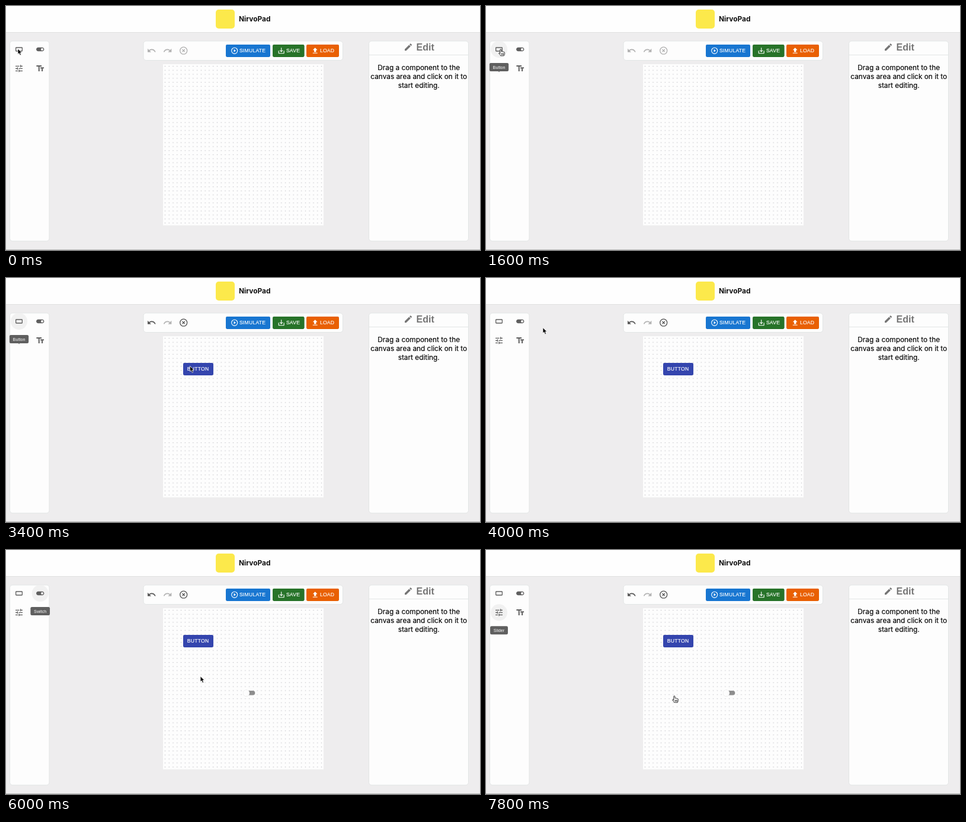
These frames come from a looping animation (800 px wide and 411 px high, 8 s). An HTML page:

```html
<!DOCTYPE html>
<html lang="en">
<head>
<meta charset="utf-8">
<title>GUI builder</title>
<style>
  html, body { margin: 0; width: 100%; height: 100%; overflow: hidden; background: #eeedee; }
  svg { display: block; width: 800px; height: 411px; }
  text { font-family: "Liberation Sans", Arial, sans-serif; }
  .ui { font-family: Inter, "Open Sans", sans-serif; }
  .hint { font-size: 11.85px; text-anchor: middle; fill: #000; stroke: #000; stroke-width: .15px; }
  .label { font-size: 8.6px; letter-spacing: .25px; fill: #fff; stroke: #fff; stroke-width: .15px; }
  .tip { font-size: 7.2px; fill: #fff; text-anchor: middle; }
  .panel { fill: #fdfdfd; stroke: #e2e5e5; }
  .lift { filter: drop-shadow(0 .7px .6px #0004); }
</style>
</head>
<body>
<svg viewBox="0 0 800 411">
  <defs>
    <pattern id="dots" x="265.1" y="98.1" width="6.77" height="6.77" patternUnits="userSpaceOnUse">
      <circle cx="3.4" cy="3.4" r=".8" fill="#c3c3c8"/>
    </pattern>
  </defs>
  <rect width="800" height="411" fill="#eeedee"/>
  <rect width="800" height="44" fill="#fefefe"/>
  <path d="M0 44.5H800" stroke="#e0e0e0"/>
  <path d="M0 410.5H800" stroke="#b9b9b9"/>
  <rect x="354" y="6" width="32" height="32" rx="5" fill="#fce94b"/>
  <text class="ui" x="393" y="26" font-size="11.9" font-weight="700" fill="#111">NirvoPad</text>

  <rect class="panel" x="6.5" y="59" width="66.5" height="337" rx="4.5"/>
  <rect class="panel" x="612.5" y="59" width="168" height="337" rx="4.5"/>
  <path d="M613 82.5H780" stroke="#e2e6e6"/>
  <rect class="panel" x="232" y="59" width="336.5" height="32.5" rx="4.5"/>
  <rect x="265" y="98" width="271" height="271.5" fill="#fdfdfd"/>
  <rect x="265" y="98" width="271" height="271.5" fill="url(#dots)"/>

  <text x="692.5" y="75" font-size="16" font-weight="700" fill="#757575">Edit</text>
  <text class="ui hint" x="696.7" y="108">Drag a component to the</text>
  <text class="ui hint" x="696.7" y="123">canvas area and click on it to</text>
  <text class="ui hint" x="696.7" y="138">start editing.</text>

  <g id="toolbar"></g>
  <g id="placedButton">
    <rect class="lift" x="299" y="143" width="51" height="21" rx="2.4" fill="#3445ae"/>
    <text class="label" x="305.7" y="156.3">BUTTON</text>
  </g>
  <g id="placedSwitch">
    <rect x="401" y="237" width="19.3" height="7.6" rx="3.8" fill="#8e8e8e"/>
    <circle class="lift" cx="405.6" cy="241" r="5.5" fill="#fdfdfd"/>
  </g>
  <circle id="hover" r="14"/>
  <g id="palette"></g>
  <g id="tooltip">
    <rect id="tipBox" y="23" height="14" rx="2.3" fill="#5f5f5f"/>
    <text id="tipText" class="tip" y="32.6"></text>
  </g>
  <g id="ghost">
    <circle r="10.5" opacity=".06"/>
    <circle r="8.5" opacity=".12"/>
    <path id="ghostIcon" transform="scale(.667) translate(-12 -12)" fill="#444"/>
  </g>
  <g id="cursor">
    <path id="arrow" d="M0 0V9.3L2.1 7.4L3.7 11L5.4 10.2L3.9 6.8H6.8Z" stroke="#fff" stroke-width=".7"/>
    <g id="hand" stroke="#111" stroke-width=".85" stroke-linejoin="round" stroke-linecap="round">
      <path fill="#fff" d="M-1.2 6.8V.8Q-1.2 -.3 -.2 -.3T.9 .8V3.7Q2.2 2.9 2.9 4Q4.2 3.3 4.8 4.5Q6.4 4.1 6.4 5.7V7.6Q6.3 9 5.3 10.8H-.3Q-1.3 8.9 -3.1 7.2Q-3.7 6.2 -2.8 5.8Q-2 5.7 -1.2 6.8Z"/>
      <path fill="none" d="M1.2 6.8V9M2.9 6.8V9M4.5 6.8V9"/>
    </g>
    <g id="plus">
      <circle cx="6" cy="15" r="6.4" fill="#2fae35"/>
      <path d="M6 11.5V18.5M2.5 15H9.5" stroke="#fff" stroke-width="1.9"/>
    </g>
  </g>
</svg>
<script>
const $ = id => document.getElementById(id);
const set = (el, attrs) => { for (const k in attrs) el.setAttribute(k, attrs[k]); };
const show = (id, on) => set($(id), { display: on ? 'inline' : 'none' });

const RING = 'M12 2a10 10 0 1 0 0 20 10 10 0 0 0 0-20zm0 18a8 8 0 1 1 0-16 8 8 0 0 1 0 16z';
const ICONS = {
  Button: 'M19 6.5H5c-1.1 0-2 .9-2 2v7c0 1.1.9 2 2 2h14c1.1 0 2-.9 2-2v-7c0-1.1-.9-2-2-2zm0 9H5v-7h14v7z',
  Switch: 'M17 7H7c-2.76 0-5 2.24-5 5s2.24 5 5 5h10c2.76 0 5-2.24 5-5s-2.24-5-5-5zm0 8c-1.66 0-3-1.34-3-3s1.34-3 3-3 3 1.34 3 3-1.34 3-3 3z',
  Slider: 'M3 17v2h6v-2H3zM3 5v2h10V5H3zm10 16v-2h8v-2h-8v-2h-2v6h2zM7 9v2H3v2h4v2h2V9H7zm14 4v-2H11v2h10zm-6-4h2V7h4V5h-4V3h-2v6z',
  Text: 'M2.5 4v3h5v12h3V7h5V4h-13zm19 5h-9v3h3v7h3v-7h3V9z',
  undo: 'M12.5 8c-2.65 0-5.05.99-6.9 2.6L2 7v9h9l-3.62-3.62c1.39-1.16 3.16-1.88 5.12-1.88 3.54 0 6.55 2.31 7.6 5.5l2.37-.78C21.08 11.03 17.15 8 12.5 8z',
  redo: 'M18.4 10.6C16.55 8.99 14.15 8 11.5 8c-4.65 0-8.58 3.03-9.96 7.22L3.9 16c1.05-3.19 4.05-5.5 7.6-5.5 1.95 0 3.73.72 5.12 1.88L13 16h9V7l-3.6 3.6z',
  clear: 'M14.59 8L12 10.59 9.41 8 8 9.41 10.59 12 8 14.59 9.41 16 12 13.41 14.59 16 16 14.59 13.41 12 16 9.41z' + RING,
  simulate: 'M10 16.5l6-4.5-6-4.5v9z' + RING,
  save: 'M19 12v7H5v-7H3v7c0 1.1.9 2 2 2h14c1.1 0 2-.9 2-2v-7h-2zm-6 .67l2.59-2.58L17 11.5l-5 5-5-5 1.41-1.41L11 12.67V3h2v9.67z',
  load: 'M5 20h14v-2H5v2zm0-10h4v6h6v-6h4l-7-7-7 7z',
  pencil: 'M3 17.25V21h3.75L17.81 9.94l-3.75-3.75L3 17.25zM20.71 7.04a1 1 0 0 0 0-1.41l-2.34-2.34a1 1 0 0 0-1.41 0l-1.83 1.83 3.75 3.75 1.83-1.83z'
};

function add(parent, tag, attrs) {
  const el = document.createElementNS('http://www.w3.org/2000/svg', tag);
  set(el, attrs);
  return parent.appendChild(el);
}
const icon = (parent, name, x, y, fill, scale = .667) => add(parent, 'path', {
  d: ICONS[name], fill, transform: `translate(${x} ${y}) scale(${scale}) translate(-12 -12)`
});

const toolbar = $('toolbar');
const [undo, , clear] = ['undo', 'redo', 'clear'].map((name, i) => icon(toolbar, name, 245.7 + 27 * i, 75.2, '#b3b3b3'));
icon(toolbar, 'pencil', 679, 69.3, '#757575');

function action(name, x, width, fill) {
  add(toolbar, 'rect', { x, y: 65, width, height: 21, rx: 2.4, fill, class: 'lift' });
  icon(toolbar, name, x + 14.7, 75.3, '#fff', .56);
  add(toolbar, 'text', { x: x + 22.9, y: 78.4, class: 'label' }).textContent = name.toUpperCase();
}
action('simulate', 371, 75, '#1876d1');
action('save', 450, 53.5, '#277329');
action('load', 507, 55, '#e96003');

const slots = {};
['Button', 'Switch', 'Slider', 'Text'].forEach((name, i) => {
  const slot = slots[name] = { x: 22 + 35.7 * (i % 2), y: 73 + 32.3 * (i >> 1) };
  icon($('palette'), name, slot.x, slot.y, '#5f5f5f');
});

// Each tool is reached, grabbed, carried to its spot and dropped
const DRAGS = [
  { tool: 'Button', reach: 600, grab: 2000, land: 2900, drop: 3200, spot: { x: 313, y: 149 } },
  { tool: 'Switch', reach: 4200, grab: 4740, land: 5300, drop: 5600, spot: { x: 408, y: 241 } },
  { tool: 'Slider', reach: 6600, grab: 6900, land: 7600, drop: 7800, spot: { x: 318, y: 246 } }
];
const REST = 150, UNHOVER = 600, LOOP = 8000, STEP = 200;

function glide(from, to, start, end, t) {
  const k = Math.min(1, Math.max(0, (t - start) / (end - start)));
  const e = k * k * (3 - 2 * k);
  return { x: from.x + (to.x - from.x) * e, y: from.y + (to.y - from.y) * e };
}

function pointer(t) {
  let pos = { x: 20, y: 72 }, free = 0;
  for (const d of DRAGS) {
    const home = { x: slots[d.tool].x + 3, y: slots[d.tool].y };
    if (t < d.reach) return glide(pos, home, free, d.reach, t);
    if (t < d.drop) return glide(home, d.spot, d.grab, d.land, t);
    pos = d.spot;
    free = d.drop + REST;
  }
  return pos;
}

function render(time) {
  const t = Math.floor(time % LOOP / STEP) * STEP;
  const { x, y } = pointer(t);
  const current = DRAGS.find(d => t >= d.reach && t < d.drop + UNHOVER);
  const dragging = current && t >= current.grab && t < current.drop;
  const inPalette = x < 74, overCanvas = x > 265;
  const hand = current && t < current.grab || t >= DRAGS[2].drop;

  set($('cursor'), { transform: `translate(${x} ${y})` });
  show('arrow', !hand);
  show('hand', hand);
  show('plus', dragging && t > current.grab && (inPalette || overCanvas));

  show('hover', current);
  show('tooltip', current);
  show('ghost', dragging);
  if (current) {
    const slot = slots[current.tool];
    set($('hover'), { cx: slot.x, cy: slot.y, fill: dragging && !inPalette ? '#d2d2d2' : '#f1f1f1' });
    set($('tooltip'), { transform: `translate(${slot.x} ${slot.y})` });
    $('tipText').textContent = current.tool;
    const width = $('tipText').getComputedTextLength() + 11.5;
    set($('tipBox'), { x: -width / 2, width });
    const ghost = inPalette ? slot : { x: x - 3, y: y + 6 };
    set($('ghost'), { transform: `translate(${ghost.x} ${ghost.y})` });
    set($('ghostIcon'), { d: ICONS[current.tool] });
  }

  const edited = t >= DRAGS[0].drop;
  for (const el of [undo, clear]) set(el, { fill: edited ? '#555' : '#b0b0b0' });
  show('placedButton', edited);
  show('placedSwitch', t >= DRAGS[1].drop);
}

const start = performance.now();
function tick() {
  render(performance.now() - start);
  requestAnimationFrame(tick);
}
tick();
</script>
</body>
</html>
```
